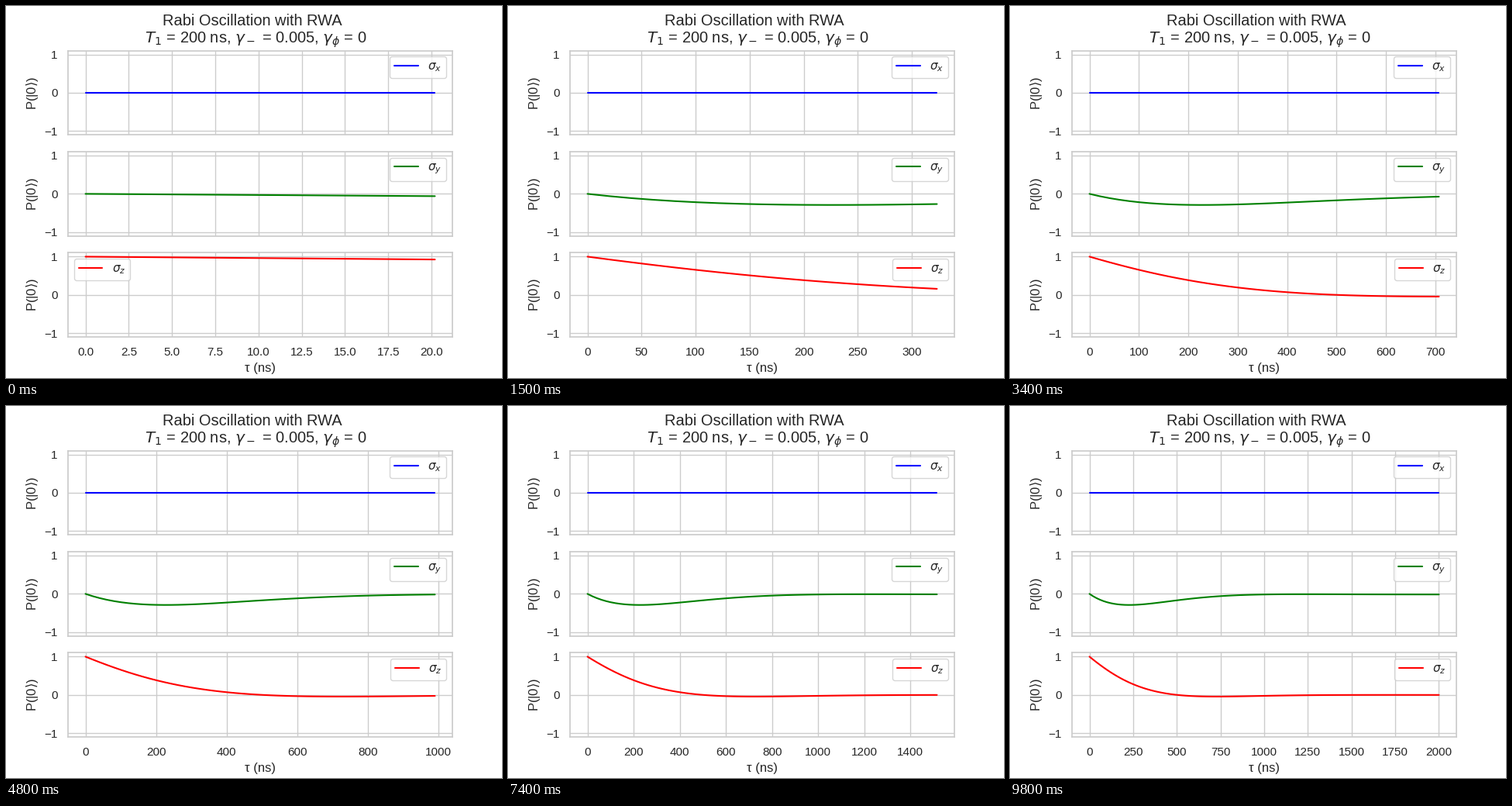
A matplotlib script that plays this animation: 640x480 px, repeating every 9900 ms.

```python
import numpy as np
import matplotlib.pyplot as plt
from matplotlib.animation import FuncAnimation

DARK, LIGHT = "0.15", "0.8"
plt.rcParams.update({
    "font.family": ["Liberation Sans", "DejaVu Sans"],
    "font.size": 12,
    "axes.labelsize": 12,
    "xtick.labelsize": 11,
    "ytick.labelsize": 11,
    "legend.fontsize": 11,
    "text.color": DARK,
    "axes.labelcolor": DARK,
    "xtick.color": DARK,
    "ytick.color": DARK,
    "axes.edgecolor": LIGHT,
    "axes.linewidth": 1.25,
    "axes.axisbelow": True,
    "axes.grid": True,
    "grid.color": LIGHT,
    "grid.linewidth": 1,
    "lines.linewidth": 1.5,
    "lines.solid_capstyle": "round",
    # Invisible ticks still set the distance of the labels.
    "xtick.bottom": False,
    "ytick.left": False,
    "xtick.major.size": 6,
    "ytick.major.size": 6,
})

GAMMA = 0.005             # relaxation rate, 1/ns
OMEGA = 2 * np.pi * 0.05  # Rabi frequency, rad/ns
SAMPLES = 100


def bloch(t):
    """Driven, relaxing qubit that starts in |0>: x, y and z over time."""
    delta = GAMMA / 4
    omega = np.sqrt(OMEGA**2 - delta**2)
    norm = 2 * OMEGA**2 + GAMMA**2
    y_end, z_end = -2 * OMEGA * GAMMA / norm, GAMMA**2 / norm
    y0, z0 = -y_end, 1 - z_end
    decay = np.exp(-0.75 * GAMMA * t)
    c, s = np.cos(omega * t), np.sin(omega * t) / omega
    y = y_end + decay * (y0 * c + (delta * y0 - OMEGA * z0) * s)
    z = z_end + decay * (z0 * c + (OMEGA * y0 - delta * z0) * s)
    return np.zeros_like(t), y, z


times = np.linspace(0, 2000, SAMPLES)
curves = bloch(times)

fig, axes = plt.subplots(3, 1, sharex=True, figsize=(6.4, 4.8), dpi=100)
fig.suptitle("Rabi Oscillation with RWA \n"
             r" $T_1$ = 200 ns, $\gamma_-$ = 0.005, $\gamma_\phi$ = 0",
             fontsize=14.4)

lines = []
for ax, name, color in zip(axes, "xyz", ("blue", "green", "red")):
    line, = ax.plot([], [], color=color, label=rf"$\sigma_{name}$")
    lines.append(line)
    ax.set_ylim(-1.1, 1.1)
    ax.set_yticks([-1, 0, 1])
    ax.set_ylabel(r"P(|0$\rangle$)")
    ax.legend(loc="best")
axes[-1].set_xlabel("τ (ns)")


def update(i):
    n = i + 2
    for line, values in zip(lines, curves):
        line.set_data(times[:n], values[:n])
    end = times[n - 1]
    axes[0].set_xlim(-0.05 * end, 1.05 * end)
    return lines


anim = FuncAnimation(fig, update, frames=SAMPLES - 1, interval=100,
                     repeat=True, repeat_delay=0, blit=False)
plt.show()
```
